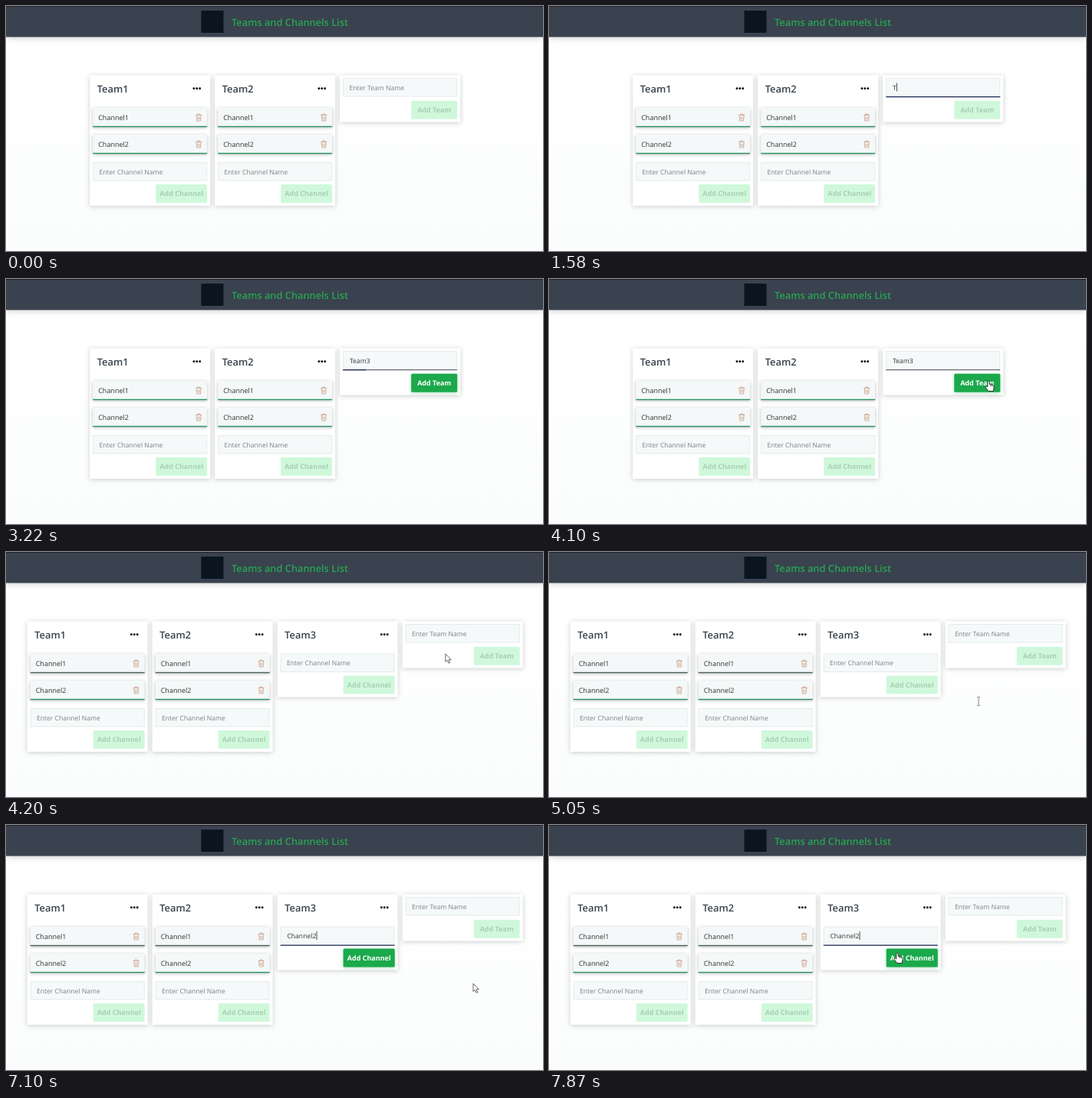
An HTML page for the animation above (8 s loop, 700 by 320 pixels).

```html
<!DOCTYPE html>
<html lang="en">
<head>
<meta charset="utf-8">
<title>Teams and Channels List</title>
<style>
  html, body { margin: 0; width: 100%; height: 100%; overflow: hidden; background: #fff; }
  svg { display: block; width: 700px; height: 320px; }
  text { font-family: "Open Sans", sans-serif; text-rendering: geometricPrecision; white-space: pre; }
  .heading { font-size: 12.8px; font-weight: 600; fill: #28a552; }
  .title { font-size: 12.9px; font-weight: 600; fill: #39424e; }
  .item { font-size: 9px; fill: #333; }
  .input { font-size: 8.6px; fill: #333; }
  .hint { font-size: 8.6px; fill: #7b8080; }
  .label { font-size: 9px; font-weight: 700; text-anchor: middle; fill: #a9ceb5; }
  .label.on { fill: #fff; }
  .header { filter: drop-shadow(0 1px 4px #0003); }
  .card { fill: #fff; filter: drop-shadow(0 1.5px 3px #0003); }
  .row { fill: #f4f8f8; filter: drop-shadow(0 1px 2px #0004); }
  .active { filter: drop-shadow(0 1px 2px #1ba94c66); }
  .trash { fill: none; stroke: #cda692; stroke-width: .9; }
</style>
</head>
<body>
<svg viewBox="0 0 700 320">
  <defs>
    <linearGradient id="page" x2="0" y2="1">
      <stop offset=".25" stop-color="#fff"/>
      <stop offset="1" stop-color="#fafdfc"/>
    </linearGradient>
  </defs>
  <rect width="700" height="320" fill="url(#page)"/>
  <rect class="header" width="700" height="40.5" fill="#39424e"/>
  <rect width="700" height="1" fill="#202327"/>
  <rect x="254.5" y="6" width="29" height="29" fill="#0b1520"/>
  <text class="heading" x="294" y="25.5">Teams and Channels List</text>
  <g id="board"></g>
</svg>
<script>
const LOOP = 8000;
const TEAM_ADDED = 4190;
const TEAM_KEYS = [1580, 1760, 1860, 1950, 2140];
const CHANNEL_KEYS = [5920, 6020, 6230, 6420, 6520, 6610, 6710, 7010];

// time, x, y, shape; the shape holds until the next entry
const POINTER = [
  [0, 704, 132, ''], [240, 704, 132, 'arrow'], [870, 510, 107, 'beam'],
  [1580, 510, 107, ''], [3610, 672, 151, 'arrow'], [3900, 573, 133, 'hand'],
  [TEAM_ADDED, 573, 133, 'arrow'], [4670, 480, 146, 'beam'], [4860, 480, 146, 'beam'],
  [5050, 560, 195, 'beam'], [5140, 560, 195, 'arrow'], [5430, 609, 207, 'arrow'],
  [7400, 609, 207, 'arrow'], [7870, 454, 167, 'hand'], [LOOP, 454, 167, 'hand']
];

const SHAPES = {
  arrow: '<path d="M0 0V10.5L2.5 8.3L4.2 12.2L5.9 11.5L4.2 7.7H7.4Z" fill="#fff" stroke="#555" stroke-width=".9"/>',
  beam: '<path d="M-2 -5.5H-.5L0 -5L.5 -5.5H2M0 -5V5M-2 5.5H-.5L0 5L.5 5.5H2" fill="none" stroke="#777" stroke-width=".9"/>',
  hand: '<path d="M-1.2 8V.6Q0 -1 1.2 .6V4.4L5.8 5.4Q7.3 6 7 8L6.2 13.5H-.2L-4 8.6Q-3.8 6.8 -2.4 7.2Z" fill="#fff" stroke="#222" stroke-width=".9"/><path d="M2.8 5V7.2M5 5.4V7.4" stroke="#222" stroke-width=".7"/>'
};

const board = document.getElementById('board');
const ruler = document.createElement('canvas').getContext('2d');
ruler.font = '8.6px "Open Sans", sans-serif';

const progress = (t, from, to) => Math.min(1, Math.max(0, (t - from) / (to - from)));
const between = (t, from, to) => t >= from && t < to;
const typed = (word, keys, t) => word.slice(0, keys.filter(k => k <= t).length);
const rect = (x, y, w, h, attrs) => `<rect x="${x}" y="${y}" width="${w}" height="${h}" ${attrs}/>`;
const text = (x, y, kind, s) => `<text class="${kind}" x="${x}" y="${y}">${s}</text>`;

function button(right, y, w, label, on = 0) {
  const face = (fill, kind) => rect(right - w, y, w, 24, `rx="1.5" fill="${fill}"`)
    + text(right - w / 2, y + 15.4, 'label ' + kind, label);
  return face('#cff8db', '') + (on ? `<g class="active" opacity="${on}">${face('#1ba94c', 'on')}</g>` : '');
}

function input(x, y, hint, { value = '', caret = false, line = '' } = {}) {
  const caretX = x + 9 + ruler.measureText(value).width;
  return rect(x + .5, y + .5, 148, 23.5, 'fill="#f5f9f9" stroke="#e4eaea"')
    + (line ? rect(x, y + 24, 149, 1.3, `fill="${line}"`) : '')
    + (value ? text(x + 8.7, y + 15.7, 'input', value) : text(x + 8.2, y + 15.7, 'hint', hint))
    + (caret ? rect(caretX, y + 6.5, .8, 11, 'fill="#222"') : '');
}

function channel(x, y, name, line) {
  return rect(x, y, 149, 25, 'class="row"') + rect(x, y + 23.8, 149, 1.4, `fill="${line}"`)
    + text(x + 7, y + 15.8, 'item', name)
    + `<path class="trash" transform="translate(${x + 134} ${y + 7.5})" d="M0 2H8M2.5 2V.5H5.5V2M1 2L1.6 9.5H6.4L7 2M3 4V8M5 4V8"/>`;
}

function teamCard(x, name, channels, firstLine, field, on) {
  const inputY = 132.5 + 35.7 * channels;
  let out = rect(x, 90.5, 157, inputY - 33.5, 'class="card"') + text(x + 9.5, 113.2, 'title', name);
  for (const dx of [135.7, 139.6, 143.5])
    out += `<circle cx="${x + dx}" cy="107.7" r="1.45" fill="#111"/>`;
  for (let i = 0; i < channels; i++)
    out += channel(x + 4, 133 + 35 * i, 'Channel' + (i + 1), i ? '#2c9160' : firstLine);
  return out + input(x + 4, inputY, 'Enter Channel Name', field)
    + button(x + 153, inputY + 29, 67, 'Add Channel', on);
}

function newTeamCard(x, field, on) {
  return rect(x, 90.5, 157, 61, 'class="card"')
    + input(x + 4, 94, 'Enter Team Name', field) + button(x + 153, 123.7, 60, 'Add Team', on);
}

function pointer(t) {
  const i = POINTER.findIndex((p, n) => n && t < p[0]) - 1;
  const [t0, x0, y0, shape] = POINTER[i], [t1, x1, y1] = POINTER[i + 1];
  if (!shape) return '';
  const p = progress(t, t0, t1), e = p * p * (3 - 2 * p);
  return `<g transform="translate(${x0 + (x1 - x0) * e} ${y0 + (y1 - y0) * e})">${SHAPES[shape]}</g>`;
}

function scene(t) {
  const added = t >= TEAM_ADDED;
  const left = added ? 27.7 : 109.2;
  const column = n => left + 163 * n;
  const firstLine = added ? '#46635f' : '#2c9160';
  let out = teamCard(column(0), 'Team1', 2, firstLine) + teamCard(column(1), 'Team2', 2, firstLine);
  if (added) {
    const focused = t >= 5140;
    out += teamCard(column(2), 'Team3', 0, '', {
      value: typed('Channel2', CHANNEL_KEYS, t),
      caret: focused && !between(t, 7400, 7850),
      line: focused ? '#27305c' : ''
    }, progress(t, 6960, 7100)) + newTeamCard(column(3));
  } else {
    const focused = t >= 780, leaving = t >= 3100;
    out += newTeamCard(column(2), {
      value: typed('Team3', TEAM_KEYS, t),
      caret: between(t, 780, 1180) || between(t, 1580, 2730),
      line: leaving ? '#68717a' : focused ? '#27305c' : ''
    }, progress(t, 2980, 3220));
    if (between(t, 3100, 3610)) out += rect(column(2) + 4, 118, 30, 1.3, 'fill="#27305c"');
  }
  return out + pointer(t);
}

let shown = '';
function frame() {
  const next = scene(performance.now() % LOOP);
  if (next !== shown) board.innerHTML = shown = next;
  requestAnimationFrame(frame);
}
frame();
</script>
</body>
</html>
```
